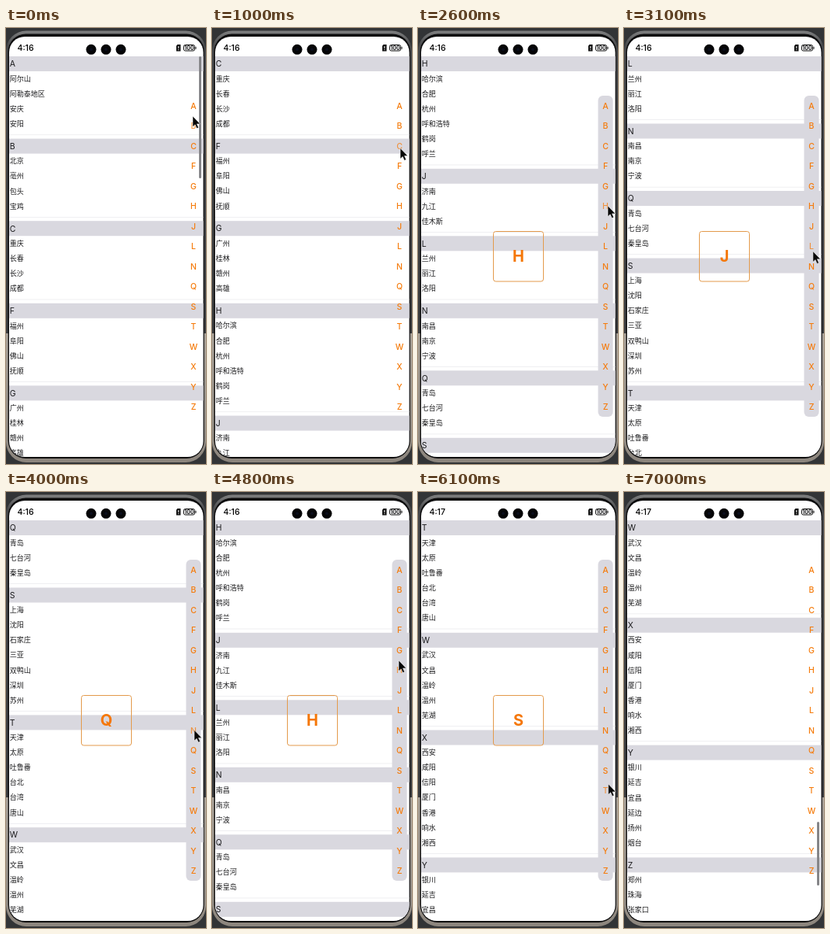
These frames come from a looping animation (256x554 px, 7.9 s). An HTML page:

```html
<!DOCTYPE html>
<html lang="zh">
<head>
<meta charset="utf-8">
<style>
html, body { margin: 0; width: 100%; height: 100%; overflow: hidden; background: #323436; }
svg { display: block; width: 100%; height: 100%; }
text { font-family: Inter, sans-serif; fill: #1c1c1e; }
.item { font: 9px "Noto Sans CJK SC", "Noto Sans CJK", sans-serif; }
.head { font-size: 10.5px; }
.key { font-size: 10.5px; font-weight: 500; fill: #f57c0d; text-anchor: middle; }
#big { font-size: 20px; font-weight: 700; fill: #f57708; text-anchor: middle; }
#clock { font-size: 10.5px; font-weight: 500; fill: #000; }
</style>
</head>
<body>
<svg viewBox="0 0 256 554">
  <defs>
    <linearGradient id="metal" x2="0" y2="554" gradientUnits="userSpaceOnUse">
      <stop offset="0" stop-color="#8a8b8b"/>
      <stop offset=".04" stop-color="#47484a"/>
      <stop offset=".7" stop-color="#3c3d3f"/>
      <stop offset=".7" stop-color="#aaa298"/>
      <stop offset=".93" stop-color="#948d84"/>
      <stop offset="1" stop-color="#8c857d"/>
    </linearGradient>
    <clipPath id="screen"><rect x="4" y="11" width="248.5" height="534" rx="20"/></clipPath>
    <clipPath id="view"><rect y="36" width="256" height="510"/></clipPath>
  </defs>
  <rect width="256" height="554" fill="#323436"/>
  <rect y="3.5" width="256" height="548.5" rx="26" fill="url(#metal)"/>
  <rect x="2.7" y="7.5" width="251" height="539.5" rx="22.5" fill="#0b0b0c"/>
  <g clip-path="url(#screen)">
    <rect width="256" height="554" fill="#fff"/>
    <g clip-path="url(#view)"><g id="list"></g></g>
    <rect id="bar" x="247" width="3" rx="1.5" fill="#858588"/>
    <rect id="track" x="230.5" y="86" width="19" height="408" rx="6" fill="#d9d8df"/>
    <g id="keys"></g>
    <g id="popup">
      <rect x="96.5" y="258.5" width="64" height="63.5" rx="3" fill="none" stroke="#e39a4c"/>
      <text id="big" x="128.5" y="297.3"></text>
    </g>
  </g>
  <text id="clock" x="14.5" y="29.3"></text>
  <g id="holes"></g>
  <path d="M218 22.5L219.5 21H223.5V29.5H218Z" fill="#111"/>
  <path d="M220.8 23V26M220.8 27V28" stroke="#fff"/>
  <rect x="227.5" y="21.5" width="14" height="7.5" rx="2" fill="#fff" stroke="#111"/>
  <path d="M243 23.8V26.8" stroke="#111"/>
  <text x="234.5" y="27.8" font-size="7" font-weight="700" text-anchor="middle">100</text>
  <path id="cursor" d="M0 0V13.5L3.1 10.8L5.2 15.6L7.5 14.6L5.4 9.9H9.6Z" fill="#080808" stroke="#fff" stroke-width=".5"/>
</svg>
<script>
const LOOP = 7900, STEP = 100;
const HEAD = 19, ROW = 19.1, GAP = 9.2, TOP = 36;
const cities = {
  A: "阿尔山 阿勒泰地区 安庆 安阳",
  B: "北京 亳州 包头 宝鸡",
  C: "重庆 长春 长沙 成都",
  F: "福州 阜阳 佛山 抚顺",
  G: "广州 桂林 赣州 高雄",
  H: "哈尔滨 合肥 杭州 呼和浩特 鹤岗 呼兰",
  J: "济南 九江 佳木斯",
  L: "兰州 丽江 洛阳",
  N: "南昌 南京 宁波",
  Q: "青岛 七台河 秦皇岛",
  S: "上海 沈阳 石家庄 三亚 双鸭山 深圳 苏州",
  T: "天津 太原 吐鲁番 台北 台湾 唐山",
  W: "武汉 文昌 温岭 温州 芜湖",
  X: "西安 咸阳 信阳 厦门 香港 响水 湘西",
  Y: "银川 延吉 宜昌 延边 扬州 烟台",
  Z: "郑州 珠海 张家口"
};
// [time, section at the top of the list]
const jumps = [
  [0, "A"], [900, "B"], [1000, "C"], [1200, "F"], [1400, "G"], [2200, "H"],
  [2800, "J"], [3000, "L"], [3200, "N"], [3400, "Q"],
  [4100, "N"], [4300, "L"], [4500, "J"], [4600, "H"],
  [5200, "J"], [5300, "L"], [5500, "N"], [5600, "Q"], [5800, "S"], [6000, "T"], [6400, "W"]
];
// [time, x, y] of the pointer tip
const path = [
  [0, 239, 112], [800, 240, 133], [1400, 243, 192], [1500, 243, 192], [1600, 243, 194],
  [1800, 243, 198], [1900, 243, 198], [2600, 243, 226], [3500, 241, 330], [3800, 241, 330],
  [4000, 241, 302.5], [4800, 239, 214], [5000, 239, 214], [6100, 243.5, 371],
  [6500, 243, 402], [6600, 240, 408], [7000, 222, 540]
];
const $ = id => document.getElementById(id);
const show = (id, on) => $(id).setAttribute("opacity", +on);
const keyY = i => 99 + 25.5 * i;

const offsets = {};
let y = 0, rows = "";
for (const [letter, names] of Object.entries(cities)) {
  offsets[letter] = y;
  rows += `<rect x="4" y="${y}" width="249" height="${HEAD}" fill="#d9d8df"/>
    <text class="head" x="4.7" y="${y + 13.3}">${letter}</text>`;
  y += HEAD;
  for (const name of names.split(" ")) {
    rows += `<text class="item" x="4.7" y="${y + 12.7}">${name}</text>`;
    y += ROW;
  }
  rows += `<rect x="4" y="${y + 4}" width="249" height=".7" fill="#e9e9ec"/>`;
  y += GAP;
}
$("list").innerHTML = rows;
$("keys").innerHTML = Object.keys(cities).map((letter, i) =>
  `<text class="key" x="240" y="${keyY(i) + 3.8}">${letter}</text>`).join("");
$("holes").innerHTML = [109, 128, 147].map(x =>
  `<circle cx="${x}" cy="27.3" r="6.5" fill="#050507"/><circle cx="${x}" cy="27.3" r="2" fill="#0b0e1c"/>`).join("");

const sectionAt = t => jumps.findLast(j => j[0] <= Math.max(t, 0))[1];

function pointerAt(t) {
  const i = path.findIndex(p => p[0] > t);
  if (i < 0) return path.at(-1).slice(1);
  const [a, b] = [path[i - 1], path[i]];
  const k = (t - a[0]) / (b[0] - a[0]);
  return [1, 2].map(n => a[n] + (b[n] - a[n]) * k);
}

function draw(now) {
  const t = Math.floor(now % LOOP / STEP) * STEP;
  const [px, py] = pointerAt(t);
  const pressed = t >= 1600 && t < 6600;
  const ending = t >= 6600;

  $("list").setAttribute("transform", `translate(0 ${TOP - offsets[sectionAt(t)]})`);
  $("clock").textContent = t < 4900 ? "4:16" : "4:17";
  $("big").textContent = sectionAt(t - 150);
  show("popup", pressed);
  show("track", pressed);

  $("bar").setAttribute("y", ending ? 419 : 36);
  $("bar").setAttribute("height", ending ? 81 : 155);
  show("bar", ending ? 1 : Math.min(1, Math.max(0, (800 - t) / 400)));

  $("cursor").setAttribute("transform", `translate(${px} ${py})`);
  show("cursor", t < 7000);
  [...$("keys").children].forEach((key, i) =>
    key.setAttribute("opacity", t < 6600 && Math.abs(py - keyY(i)) < 12.7 ? .75 : 1));
  requestAnimationFrame(draw);
}
requestAnimationFrame(draw);
</script>
</body>
</html>
```
